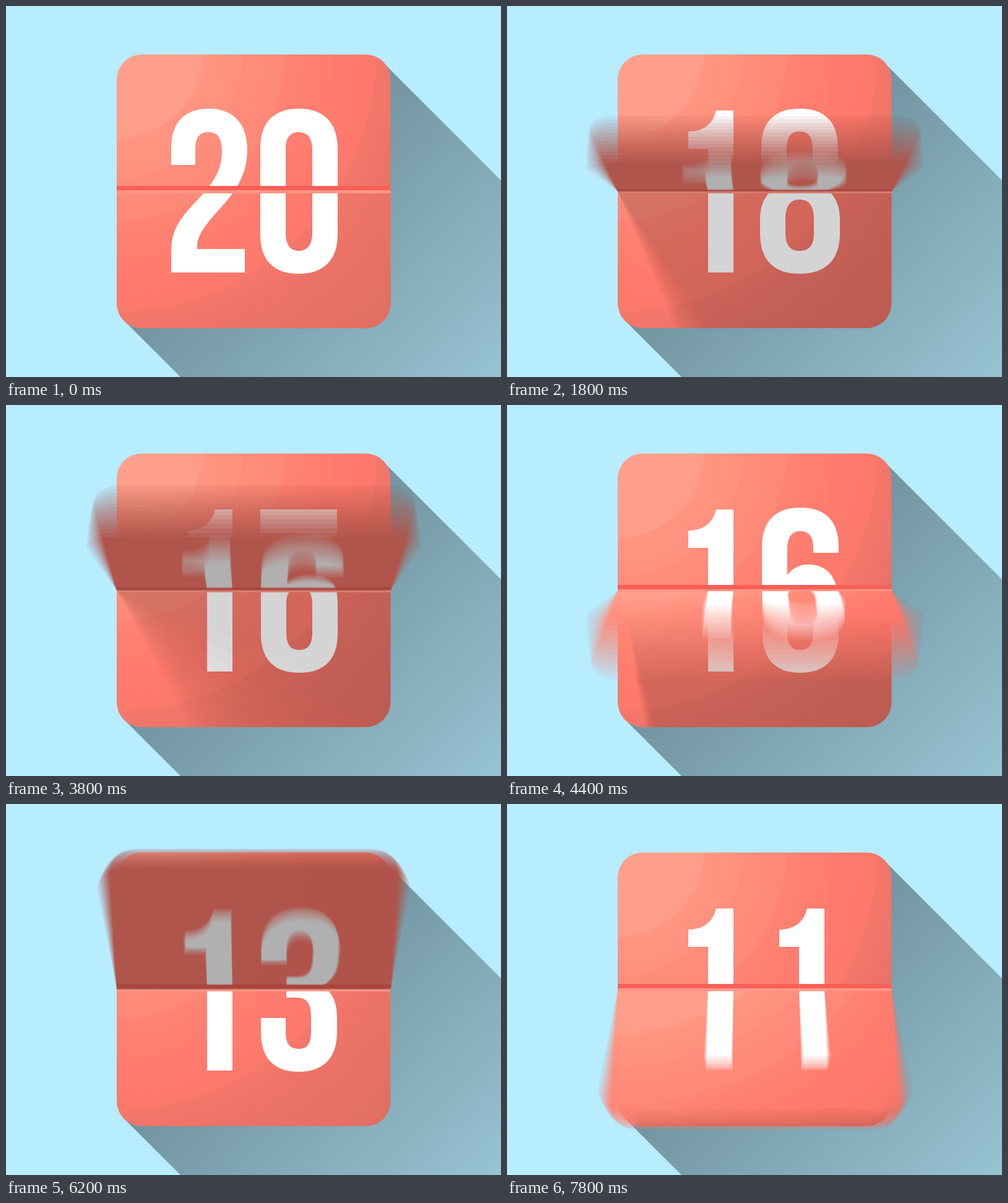
Recreate the animation shown at these times as an HTML page with a canvas. Size 800x600 px, loop 8000 ms.

```html
<!DOCTYPE html>
<html lang="en">
<head>
<meta charset="utf-8">
<title>Flip countdown</title>
<style>
  html, body { margin: 0; width: 100%; height: 100%; overflow: hidden; background: #b8ecff; }
  canvas { display: block; width: 800px; height: 600px; }
</style>
</head>
<body>
<canvas id="stage" width="800" height="600"></canvas>
<script>
const W = 800, H = 600, LOOP = 8000, STEP = 200;
const CARD = { x: 179, y: 78.5, w: 442.5, h: 442.5, r: 40 };
const HINGE = 300, HALF = 221.5, DEPTH = 980;
const SAMPLES = 14, SHUTTER = 0.5, FIRST = 20;

// Card flips completed at each step; the countdown gathers speed.
const PACE = [[0, 0], [9, 1.644], [14, 2.586], [19, 3.717], [25, 5.217], [31, 6.917], [39, 9.233]];

// Condensed numerals: x around the digit axis, y on the stage.
const SIX = 'M63 239H22V231C22 212 14 204 1 204S-20 213-20 234V275C-12 264 0 258 14 258C47 258 63 282 63 322V370C63 411 42 433 1 433S-61 411-61 370V231C-61 188-40 166 1 166S63 188 63 228Z' +
  'M-20 322V368C-20 388-13 396 1 396S22 388 22 368V322C22 304 16 296 1 296S-20 304-20 322Z';
const DIGITS = [
  'M-62 230C-62 188-40 166 0 166S63 188 63 230V369C63 411 41 433 0 433S-62 411-62 369ZM-21 232V367C-21 387-13 396 0 396S22 387 22 367V232C22 212 13 204 0 204S-21 212-21 232Z',
  'M12 169H40V431H-1V231H-33V203C-12 203 6 194 12 169Z',
  'M-59 257V230C-59 188-37 166 2 166S64 190 64 232C64 258 57 275 47 293C28 325-17 358-17 388V393H60V431H-59V395C-59 352-31 330-6 302C12 281 23 262 23 235C23 214 16 204 1 204S-20 213-20 232V257Z',
  'M-61 346H-21V368C-21 388-14 396 0 396S20 388 20 368V344C20 322 13 313-4 313H-20V277H-4C13 277 20 268 20 247V230C20 212 13 204 0 204S-21 212-21 232V251H-61V230C-61 188-39 166 0 166S61 188 61 228V243C61 270 52 286 35 294C54 302 62 320 62 345V369C62 411 40 433 0 433S-61 411-61 369Z',
  'M5 169H45V352H63V389H45V431H5V389H-62V352ZM5 242L-26 352H5Z',
  'M-53 169H55V207H-16L-20 269C-10 256 2 250 18 250C48 250 63 274 63 314V369C63 411 41 433 1 433S-60 411-60 369V344H-20V368C-20 388-13 396 1 396S22 388 22 368V314C22 295 15 287 2 287S-20 295-20 314V320H-60Z',
  SIX,
  'M-62 169H62V207L1 431H-39L20 207H-62Z',
  'M0 166C41 166 65 186 65 226V240C65 268 54 286 38 294C56 303 65 320 65 346V367C65 411 42 433 0 433S-64 411-64 367V346C-64 320-55 303-37 294C-53 286-64 268-64 240V226C-64 186-41 166 0 166Z' +
  'M-23 344V368C-23 388-14 396 0 396S23 388 23 368V344C23 322 14 313 0 313S-23 322-23 344Z' +
  'M-23 232V248C-23 268-14 276 0 276S23 268 23 248V232C23 212 14 204 0 204S-23 212-23 232Z'
].map(d => new Path2D(d));
DIGITS[9] = new Path2D();
DIGITS[9].addPath(DIGITS[6], new DOMMatrix([-1, 0, 0, -1, 1, 599]));

const CARD_BANDS = [
  [0, '#ffa18d'], [143, '#ff9d89'], [143, '#ff9582'], [207, '#ff907e'], [207, '#ff8d7b'],
  [276, '#ff8877'], [276, '#ff8373'], [360, '#ff7b6d'], [423, '#fb796b'], [423, '#f4776a'],
  [483, '#ec7367'], [640, '#e06d61']
];
const DIGIT_BANDS = [[0, '#fff'], [432, '#fff'], [432, '#f3f3f3'], [640, '#f3f3f3']];

const out = document.getElementById('stage').getContext('2d');
const newLayer = () => Object.assign(document.createElement('canvas'), { width: W, height: H }).getContext('2d');
const scene = newLayer(), flap = newLayer(), backdrop = newLayer();
const cards = new Map();
const clamp01 = v => Math.min(1, Math.max(0, v));

function bands(ctx, stops, shift) {
  const gradient = ctx.createRadialGradient(176, 72, shift, 176, 72, shift + 640);
  for (const [r, color] of stops) gradient.addColorStop(r / 640, color);
  return gradient;
}

function clipCard(ctx) {
  ctx.beginPath();
  ctx.roundRect(CARD.x, CARD.y, CARD.w, CARD.h, CARD.r);
  ctx.clip();
}

function fillCard(ctx, style, alpha = 1) {
  ctx.globalAlpha = alpha;
  ctx.fillStyle = style;
  ctx.fillRect(CARD.x - 1, CARD.y - 1, CARD.w + 2, CARD.h + 2);
  ctx.globalAlpha = 1;
}

// shift widens the highlight, dim turns the face into its unlit side.
function paintCard(ctx, number, shift = 0, dim = 0) {
  ctx.clearRect(0, 0, W, H);
  ctx.save();
  clipCard(ctx);
  fillCard(ctx, bands(ctx, CARD_BANDS, shift));
  fillCard(ctx, '#ff7b6d', dim);
  ctx.fillStyle = bands(ctx, DIGIT_BANDS, shift);
  [[326, Math.floor(number / 10)], [473, number % 10]].forEach(([x, digit]) => {
    ctx.translate(x, 0);
    ctx.fill(DIGITS[digit], 'evenodd');
    ctx.translate(-x, 0);
  });
  ctx.fillStyle = '#f95f57';
  ctx.fillRect(170, 291, 460, 7);
  ctx.fillStyle = '#ff9686';
  ctx.fillRect(170, 298, 460, 5);
  fillCard(ctx, '#000', 0.31 * dim);
  ctx.restore();
}

function restingCard(number) {
  if (!cards.has(number)) {
    const layer = newLayer();
    paintCard(layer, number);
    cards.set(number, layer.canvas);
  }
  return cards.get(number);
}

function paintBackdrop(ctx) {
  ctx.fillStyle = '#b8ecff';
  ctx.fillRect(0, 0, W, H);
  const fade = ctx.createLinearGradient(360, 360, 700, 700);
  fade.addColorStop(0, '#7294a0');
  fade.addColorStop(1, '#97c3d3');
  ctx.fillStyle = fade;
  ctx.fill(new Path2D('M609 91L1209 691H791L191 509L282 600H1200L609 91Z'.replace('H791L191 509L282 600H1200L609 91', 'L791 1109L191 509')));
}

function castShadow(ctx, angle) {
  const dx = 0.307 * Math.sin(angle);
  const dy = Math.cos(angle) + 0.89 * Math.sin(angle);
  if (angle === 0 || dy <= 0) return;
  const reach = 2000 / Math.hypot(dx, dy), endY = HINGE + dy * reach;
  ctx.save();
  clipCard(ctx);
  ctx.beginPath();
  ctx.moveTo(CARD.x, HINGE);
  ctx.lineTo(CARD.x + dx * reach, endY);
  ctx.lineTo(3000, endY);
  ctx.lineTo(3000, HINGE);
  ctx.fillStyle = 'rgba(0,0,0,.17)';
  ctx.fill();
  ctx.restore();
}

// Projects one half of the face in perspective, one stage row at a time.
function drawFlap(ctx, face, angle) {
  const cos = Math.abs(Math.cos(angle)), lift = Math.sin(angle) / DEPTH;
  const down = angle < Math.PI / 2;
  const radius = row => row / (cos + row * lift);
  for (let row = 0; radius(row) < HALF; row++) {
    const near = radius(row), far = Math.min(HALF, radius(row + 1));
    const scale = 1 / (1 - (near + far) / 2 * lift);
    ctx.drawImage(face,
      0, down ? HINGE + near : HINGE - far, W, far - near,
      W / 2 * (1 - scale), down ? HINGE + row : HINGE - row - 1, W * scale, 1);
  }
}

function drawScene(turns) {
  const done = Math.floor(turns), angle = (turns - done) * Math.PI;
  const degrees = angle * 180 / Math.PI;
  const number = FIRST - done, next = number - 1;
  scene.drawImage(backdrop.canvas, 0, 0);
  scene.drawImage(restingCard(number), 0, 0, W, HINGE, 0, 0, W, HINGE);
  scene.drawImage(restingCard(next), 0, HINGE, W, H - HINGE, 0, HINGE, W, H - HINGE);
  castShadow(scene, angle);
  if (degrees < 90) paintCard(flap, number, 172 * clamp01(degrees / 12));
  else paintCard(flap, next, 0, clamp01((180 - degrees) / 15));
  drawFlap(scene, flap.canvas, angle);
}

// Smooth cubic through the pace points.
function turnsAt(step) {
  const last = PACE.length - 1;
  let i = 0;
  while (i < last - 1 && step > PACE[i + 1][0]) i++;
  const slope = k => {
    const a = PACE[Math.max(0, k - 1)], b = PACE[Math.min(last, k + 1)];
    return (b[1] - a[1]) / (b[0] - a[0]);
  };
  const [x0, y0] = PACE[i], [x1, y1] = PACE[i + 1];
  const span = x1 - x0, u = (step - x0) / span, v = 1 - u;
  return y0 * v * v * (1 + 2 * u) + y1 * u * u * (1 + 2 * v) +
    span * u * v * (slope(i) * v - slope(i + 1) * u);
}

// Averages several moments of the shutter into one motion-blurred picture.
function render(step) {
  const count = step ? SAMPLES : 1;
  for (let i = 0; i < count; i++) {
    drawScene(turnsAt(Math.max(0, step - SHUTTER * i / (SAMPLES - 1))));
    out.globalAlpha = 1 / (i + 1);
    out.drawImage(scene.canvas, 0, 0);
  }
}

let shown = -1;
function tick(now) {
  const step = Math.floor(now % LOOP / STEP);
  if (step !== shown) render(shown = step);
  requestAnimationFrame(tick);
}

paintBackdrop(backdrop);
requestAnimationFrame(tick);
</script>
</body>
</html>
```
